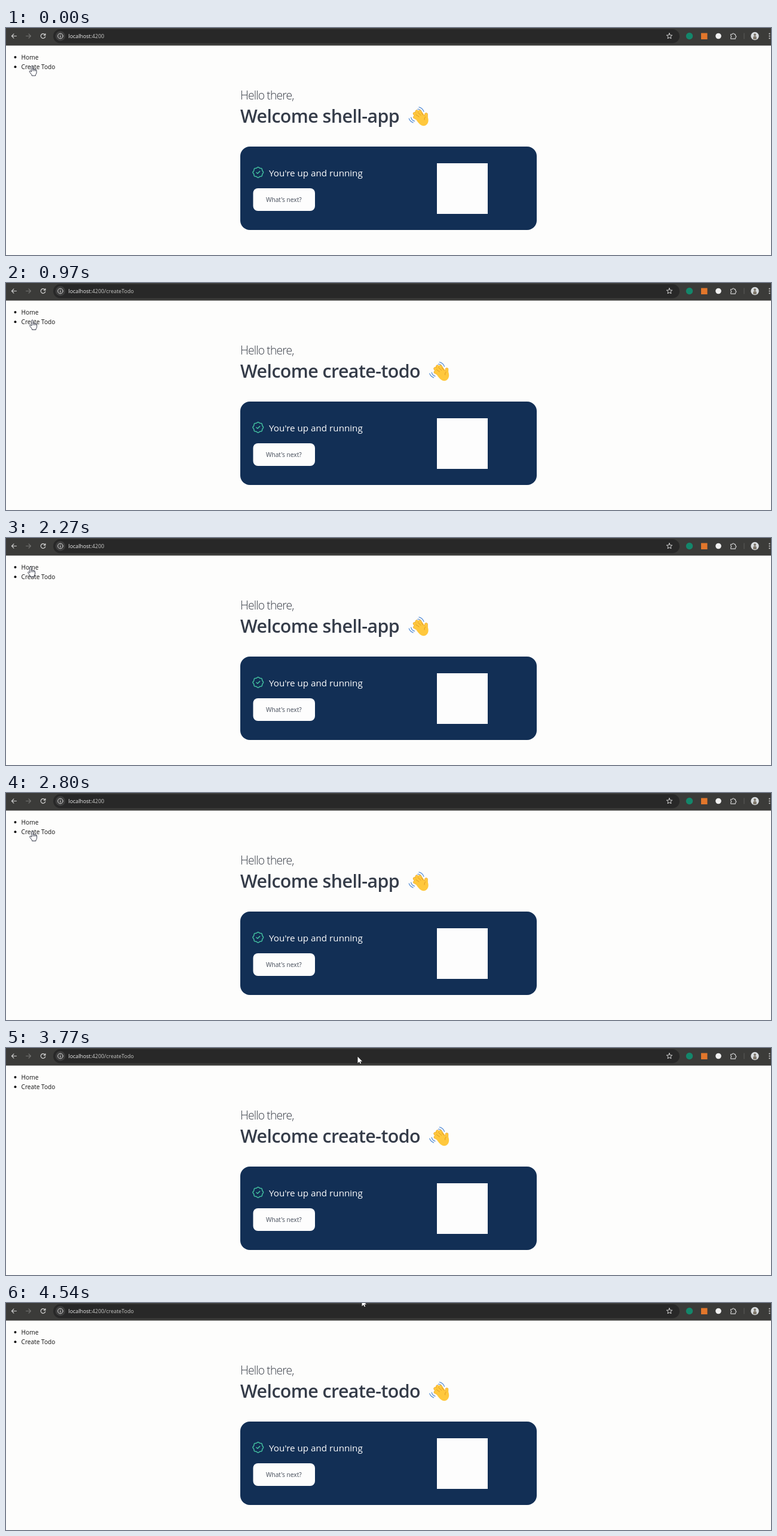
An HTML page with a canvas that plays this animation: 1280x381 px, repeating every 4600 ms.

```html
<!DOCTYPE html>
<html lang="en">
<head>
<meta charset="utf-8">
<title>Todo shell</title>
<style>
html, body { margin: 0; width: 100%; height: 100%; overflow: hidden; background: #fdfdfc; }
canvas { display: block; width: 1280px; height: 381px; }
</style>
</head>
<body>
<canvas id="stage" width="1280" height="381"></canvas>
<script>
const ctx = document.getElementById('stage').getContext('2d');
const LOOP = 4600;
const ROUTES = [[0, false], [600, true], [2000, false], [3480, true]];
// Pointer tip: time, x, y
const POINTER = [
  [0, 43.5, 63], [300, 43.5, 63], [480, 44, 61.5], [1250, 44, 61.5],
  [1450, 41, 48], [2400, 41, 48], [2650, 44, 63.5], [3540, 44, 63.5],
  [3770, 588.5, 14.5], [3860, 595.5, -5.5], [LOOP, 595.5, -5.5]
];

function text(str, x, y, size, color, weight = 400, spacing = 0) {
  ctx.font = `${weight} ${size}px "Open Sans", "Noto Sans", sans-serif`;
  ctx.letterSpacing = spacing + 'px';
  ctx.fillStyle = color;
  ctx.fillText(str, x, y);
  return ctx.measureText(str).width;
}

function box(x, y, w, h, r, color) {
  ctx.fillStyle = color;
  ctx.beginPath();
  ctx.roundRect(x, y, w, h, r);
  ctx.fill();
}

function disc(x, y, r, color) {
  ctx.fillStyle = color;
  ctx.beginPath();
  ctx.arc(x, y, r, 0, Math.PI * 2);
  ctx.fill();
}

function stroke(path, color, width) {
  ctx.strokeStyle = color;
  ctx.lineWidth = width;
  ctx.lineCap = ctx.lineJoin = 'round';
  ctx.stroke(new Path2D(path));
}

function at(x, y, draw) {
  ctx.save();
  ctx.translate(x, y);
  draw();
  ctx.restore();
}

function star() {
  let path = '';
  for (let i = 0; i < 10; i++) {
    const a = -Math.PI / 2 + i * Math.PI / 5, r = i % 2 ? 2.2 : 5;
    path += (i ? 'L' : 'M') + r * Math.cos(a) + ' ' + r * Math.sin(a);
  }
  stroke(path + 'Z', '#d6d6d6', 1);
}

function toolbar(created) {
  box(0, 0, 1280, 29.5, 0, '#3b3b39');
  box(79, 2, 1048, 23.5, 11.75, '#282828');
  at(13.5, 13.5, () => stroke('M4 0H-4M-.5 -3.5L-4 0L-.5 3.5', '#d0d0d0', 1.1));
  at(37.5, 13.5, () => stroke('M-4 0H4M.5 -3.5L4 0L.5 3.5', '#737371', 1.1));
  at(62, 13.5, () => stroke('M3.3 -2A3.8 3.8 0 1 0 3.7 1M3.9 -4V-1.4H1.2', '#d6d6d6', 1.2));
  disc(91, 13.5, 8.2, '#3e3e3e');
  at(91, 13.5, () => {
    stroke('M4.3 0A4.3 4.3 0 1 1 -4.3 0A4.3 4.3 0 1 1 4.3 0Z', '#d8d8d8', 1);
    stroke('M0 -.2V2M0 -2V-1.9', '#d8d8d8', 1.1);
  });
  const hostWidth = text('localhost', 104.5, 17, 8.9, '#f0f0f0');
  text(':4200' + (created ? '/createTodo' : ''), 104.5 + hostWidth, 17, 8.9, '#c9c9c7');

  at(1110, 13.7, star);
  disc(1143.5, 13.5, 5.7, '#14876b');
  box(1163, 8.5, 10.5, 10.5, 0, '#e2762b');
  disc(1192, 13.5, 4.8, '#f2f2f2');
  at(1217, 13.5, () => stroke(
    'M-4.3 -3H-1.6A1.5 1.5 0 1 1 1.4 -3H3.4V-.4A1.5 1.5 0 1 1 3.4 2.6V4.6H-4.3V2.3A1.5 1.5 0 0 0 -4.3 -.6Z',
    '#d0d0d0', 1.1));
  box(1234.5, 8.5, 1, 10, 0, '#5c5c5a');
  disc(1253, 13.5, 6.7, '#d9dde0');
  disc(1253, 11.3, 2, '#7d7568');
  box(1250.2, 13.5, 5.6, 5.4, [2.5, 2.5, 1, 1], '#7d7568');
  for (const y of [9.7, 13.5, 17.3]) disc(1277.5, y, 1.1, '#d0d0d0');
}

function wave() {
  stroke('M-1 -11.8A7 7 0 0 1 5.2 -7.2M1 -15.2A11 11 0 0 1 9 -7.8', '#5a91d8', 1.3);
  stroke('M-12.3 2.2A8 8 0 0 0 -6.5 8.3M-15.7 4A12 12 0 0 0 -8.8 10.8', '#5a91d8', 1.3);
  const fingers = 'M5 8L-6 1.5M5 5L-6.3 -4.2M7 3L-2.7 -7.8M9 2L2.5 -7.8M12.8 7L13 -3';
  stroke(fingers, '#e39a25', 5.4);
  stroke(fingers, '#ffc83d', 4.6);
  ctx.fillStyle = '#ffc83d';
  ctx.fill(new Path2D('M-5 3L5 -4L10 2L15 0C18 6 17 13 12 15.5C6 18 1 13 -3 7Z'));
  stroke('M1 1L-4.2 -2.6M4.2 -1.5L-1 -6.5M8 -1.8L4.6 -6M10 6Q9.5 2.5 12 1', '#d98c20', .8);
}

function badge() {
  const points = Array.from({ length: 97 }, (_, i) => {
    const a = i * Math.PI / 48, r = 8.2 + .55 * Math.cos(8 * a);
    return r * Math.cos(a) + ' ' + r * Math.sin(a);
  });
  stroke('M' + points.join('L') + 'Z', '#43bf9f', 1.5);
  stroke('M-2.8 .2L-.9 2L2.8 -1.7', '#43bf9f', 1.5);
}

function page(created) {
  disc(15.5, 49, 2, '#111');
  text('Home', 25.5, 52.5, 10.2, '#111');
  disc(15.5, 65.3, 2, '#111');
  text('Create Todo', 25.5, 69, 10.15, '#111');

  text('Hello there,', 392, 120, 19.3, '#3a3f49', 300, -.85);
  text('Welcome ' + (created ? 'create-todo' : 'shell-app'), 392, 158.5, 30.4, '#353c49', 600, -.58);
  at(created ? 724.5 : 690, 148, wave);

  box(392, 199, 496, 140, 16, '#122f55');
  at(421.8, 242.3, badge);
  text("You're up and running", 440, 249, 15.2, '#fdfdfd');
  box(413.5, 269, 103.5, 38, 8, '#fdfdfd');
  text("What's next?", 435, 292, 10.2, '#414956');
  box(721, 227, 85, 85, 0, '#fdfdfd');
}

function pointerAt(t) {
  const i = POINTER.findIndex(key => key[0] > t);
  const [t0, x0, y0] = POINTER[i - 1], [t1, x1, y1] = POINTER[i];
  const p = (t - t0) / (t1 - t0), e = p * p * (3 - 2 * p);
  return [x0 + (x1 - x0) * e, y0 + (y1 - y0) * e];
}

function pointer(t) {
  const [x, y] = pointerAt(t);
  const hand = x < 84;
  const shape = hand
    ? 'M-1.3 1.2Q0 -.8 1.3 1.2V6Q2.6 5 3.6 6.5Q5 5.6 5.8 7.1Q7.5 6.4 7.6 8.4V12Q7.4 14 6 15.5V17H-.4V15.6L-4.2 10.6Q-4.5 8.4 -2.6 9L-1.3 10.3Z'
    : 'M0 0V11L2.6 8.6L4.3 12L5.8 11.3L4.2 8H7.7Z';
  at(x, y, () => {
    ctx.fillStyle = '#fff';
    if (!hand) stroke(shape, '#1c1c1c', 1.2);
    ctx.fill(new Path2D(shape));
    if (hand) stroke(shape + 'M1.3 6V9M3.6 6.5V9M5.8 7.1V9', '#252a3a', .9);
  });
}

function draw(now) {
  const t = now % LOOP;
  const created = ROUTES.filter(([start]) => start <= t).pop()[1];
  box(0, 0, 1280, 381, 0, '#fdfdfc');
  toolbar(created);
  page(created);
  pointer(t);
}

const start = performance.now();
function tick() {
  draw(performance.now() - start);
  requestAnimationFrame(tick);
}
tick();
</script>
</body>
</html>
```
